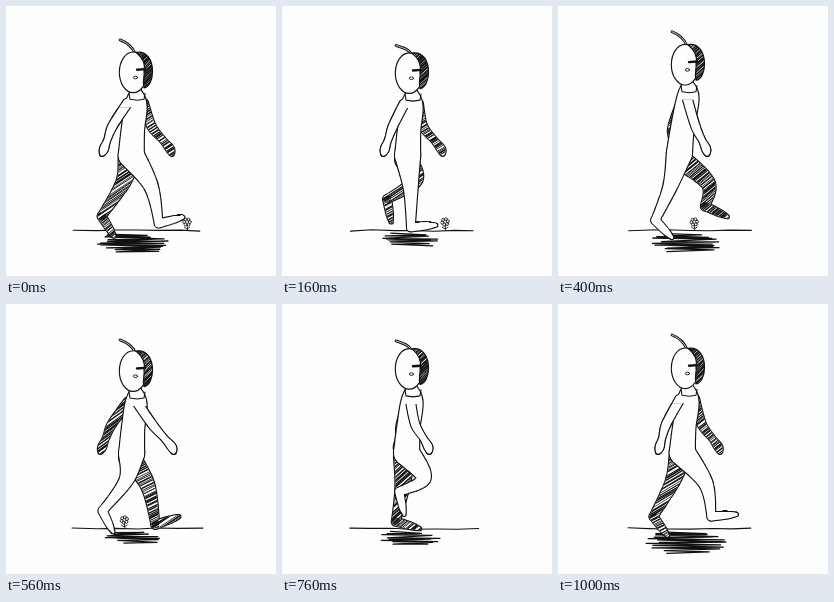
Recreate the animation shown at these times as an HTML page with a canvas. Size 270 px wide and 270 px high, loop 1040 ms.

```html
<!DOCTYPE html>
<html>
<head>
<meta charset="utf-8">
<title>Walk cycle</title>
<style>
html, body { margin: 0; width: 100%; height: 100%; overflow: hidden; background: #fefefe; }
canvas { display: block; width: 100%; height: 100%; }
</style>
</head>
<body>
<canvas id="stage" width="270" height="270"></canvas>
<script>
const LOOP = 1040, STEP = 40, INK = '#111', PAPER = '#fefefe';
const ctx = document.getElementById('stage').getContext('2d');

let seed = 1;
const rand = () => (seed = seed * 16807 % 2147483647) / 2147483647;
const jitter = a => (rand() - 0.5) * 2 * a;
const lerp = (a, b, u) => a + (b - a) * u;

// Cosine that peaks at the given time; one stride has two steps
const stride = (t, peak) => Math.cos((t - peak) / LOOP * 2 * Math.PI);
const step = (t, peak) => Math.cos((t - peak) / LOOP * 4 * Math.PI);

function hermite(a, b, ma, mb, u) {
  const v = 1 - u;
  return a * v * v * (1 + 2 * u) + b * u * u * (3 - 2 * u) + ma * u * v * v - mb * u * u * v;
}

// Tapered tube through [x, y, radius] joints
function tube(...joints) {
  const path = new Path2D(), last = joints.length - 1;
  const joint = i => joints[Math.max(0, Math.min(last, i))];
  for (let i = 0; i < last; i++) {
    for (let k = 0; k <= 36; k++) {
      const u = k / 36;
      const [x, y, r] = [0, 1, 2].map(c => hermite(joint(i)[c], joint(i + 1)[c],
        (joint(i + 1)[c] - joint(i - 1)[c]) / 2, (joint(i + 2)[c] - joint(i)[c]) / 2, u));
      path.moveTo(x + r, y);
      path.arc(x, y, r, 0, 7);
    }
  }
  return path;
}

// One outline around several overlapping paths
function solid(...paths) {
  ctx.lineWidth = 2.3;
  paths.forEach(p => ctx.stroke(p));
  ctx.fillStyle = PAPER;
  paths.forEach(p => ctx.fill(p));
}

function line(width, ...pts) {
  ctx.lineWidth = width;
  ctx.beginPath();
  pts.forEach(([x, y]) => ctx.lineTo(x, y));
  ctx.stroke();
}

// Slanted pen strokes inside a path
function hatch(path, gap) {
  const slope = 0.7 + jitter(0.2);
  ctx.save();
  ctx.clip(path);
  for (let y = 0; y < 330; y += gap) {
    line(0.7 + rand() * 0.7, [80, y + 45 * slope + jitter(1.5)], [185, y - 60 * slope + jitter(1.5)]);
  }
  ctx.restore();
}

function legPaths(t, x, y, width) {
  const knee = [131 + 19 * stride(t, 920), 179 + 5 * stride(t, 200)];
  const ankle = [
    120 + 29 * stride(t, 1010) + 4.5 * step(t, 1010),
    208 + 15 * stride(t, 220) + 6 * step(t, 20)
  ];
  const tilt = (36 + 46 * stride(t, 620) - 14 * step(t, 20)) * Math.PI / 180;
  const toe = [ankle[0] + 25 * Math.cos(tilt), ankle[1] + 23 * Math.sin(tilt)];
  return [
    tube([x, y, width], [...knee, 6.8], [...ankle, 3.8]),
    tube([...ankle, 4], [lerp(ankle[0], toe[0], 0.6), lerp(ankle[1], toe[1], 0.6), 3.3], [...toe, 1.5])
  ];
}

// The shoulder follows the hand by the given reach
function armPath(t, y, x, reach) {
  const swing = stride(t, 575);
  const elbow = [126 + 20 * stride(t, 560), 120], hand = [131 + 35 * swing, 143];
  const wrist = [lerp(elbow[0], hand[0], 0.62), lerp(elbow[1], hand[1], 0.62)];
  const tip = [hand[0] + 2 * swing, hand[1] + 5];
  return tube([x + reach * swing, y, 4.5], [...elbow, 4.1], [...wrist, 3], [...hand, 3.9], [...tip, 1.8]);
}

function drawGround(t) {
  const ground = [];
  for (let x = 68; x <= 194; x += 21) ground.push([x + jitter(3), 224.5 + jitter(0.8)]);
  line(1.1, ...ground);

  // Loose scribble, widest in the middle
  const half = 33 - 6 * step(t, 140) + 3 * stride(t, 0);
  const depth = 15 - 5 * step(t, 140) + 3 * stride(t, 0);
  const pts = [];
  for (let v = 0; v <= depth; v += 0.85) {
    const u = v / depth, lens = half * (0.6 + 0.4 * Math.sin(u * Math.PI));
    const side = pts.length % 2 ? 1 : -1;
    pts.push([128 + 8 * (u - 0.5) + side * lens * (0.65 + 0.4 * rand()), 228 + v + jitter(1)]);
  }
  line(1.25, ...pts);
}

function drawFlower(t) {
  if (t >= 760) return;
  const x = 181 - 0.112 * t, y = 216;
  line(0.9, [x, y + 3], [x + 0.6, y + 8]);
  line(0.8, [x - 3, y + 5], [x, y + 7], [x + 3, y + 5]);
  ctx.lineWidth = 0.8;
  for (let i = 0; i < 6; i++) {
    const a = i * Math.PI / 3 + t / 200;
    ctx.beginPath();
    ctx.arc(x + 2.8 * Math.cos(a), y + 2.8 * Math.sin(a), 1.5, 0, 7);
    ctx.stroke();
  }
}

function drawHead(t, x, y) {
  ctx.save();
  ctx.translate(x, y);

  const tip = -30.5 + 3 * step(t, 190);
  const antenna = new Path2D(`M-1,-19 C-3,-24 -8,${tip + 3} -16,${tip}`);
  ctx.lineWidth = 2.8;
  ctx.stroke(antenna);
  ctx.strokeStyle = PAPER;
  ctx.lineWidth = 0.8;
  ctx.stroke(antenna);
  ctx.strokeStyle = INK;

  const face = new Path2D();
  face.ellipse(-2.8, 0, 13.3, 19.7, 0, 0, 7);
  solid(face);

  const shade = new Path2D('M0,-20 C11,-22 16.5,-12 16.5,-1 C16.5,8 13,15 8,15.5 C6,9 9,4 8,-1 C10,-9 6,-15 0,-20Z');
  ctx.fillStyle = PAPER;
  ctx.fill(shade);
  ctx.save();
  ctx.clip(shade);
  for (let dy = -32; dy < 40; dy += 1.3) line(0.8 + rand() * 0.6, [-2, dy + 10 + jitter(1)], [18, dy - 8 + jitter(1)]);
  ctx.restore();
  ctx.lineWidth = 1.2;
  ctx.stroke(shade);

  line(2.4, [1, -2.6], [9, -3.2]);
  ctx.lineWidth = 0.9;
  ctx.beginPath();
  ctx.ellipse(-0.5, 5.2, 2.2, 1.3, 0, 0, 7);
  ctx.stroke();
  ctx.restore();
}

function draw(t) {
  seed = 4217 + t * 37;
  for (let i = 0; i < 5; i++) rand();
  ctx.fillStyle = PAPER;
  ctx.fillRect(0, 0, 270, 270);
  ctx.strokeStyle = INK;
  ctx.lineCap = ctx.lineJoin = 'round';

  const bob = 4.6 * step(t, 105) - 1.4 * Math.cos((t - 105) / LOOP * 8 * Math.PI);
  const hx = 130, hy = 63.8 + bob;
  const px = 123 + 0.5 * bob, py = 148.5 + 0.25 * bob;
  const far = t + LOOP / 2, shoulder = hy + 31;
  drawGround(t);
  drawFlower(t);

  const farArm = armPath(far, shoulder, 130, 8);
  solid(farArm);
  hatch(farArm, 1.6);
  const farLeg = legPaths(far, px - 1, py + 4, 10.5);
  solid(...farLeg);
  farLeg.forEach(p => hatch(p, 1.7));

  const torso = tube(
    [hx, hy + 18, 4], [hx, hy + 33, 10.5],
    [lerp(hx, px, 0.55), lerp(hy + 33, py, 0.5), 11.2], [px + 1, py, 12.5]
  );
  const arm = armPath(t, shoulder, 126, 5);
  solid(torso, ...legPaths(t, px + 1, py, 12.5), arm);

  // Inner edges of the near arm fade into the shoulder
  ctx.save();
  ctx.beginPath();
  ctx.rect(0, shoulder + 4, 270, 270);
  ctx.clip();
  solid(arm);
  ctx.restore();

  line(1.1, [hx - 7, hy + 21], [hx - 6, hy + 27], [hx + 1, hy + 28], [hx + 8, hy + 27], [hx + 9, hy + 21]);
  drawHead(t, hx, hy);
}

const start = performance.now();
function tick() {
  const elapsed = (performance.now() - start) % LOOP;
  draw(Math.floor(elapsed / STEP) * STEP);
  requestAnimationFrame(tick);
}
tick();
</script>
</body>
</html>
```
